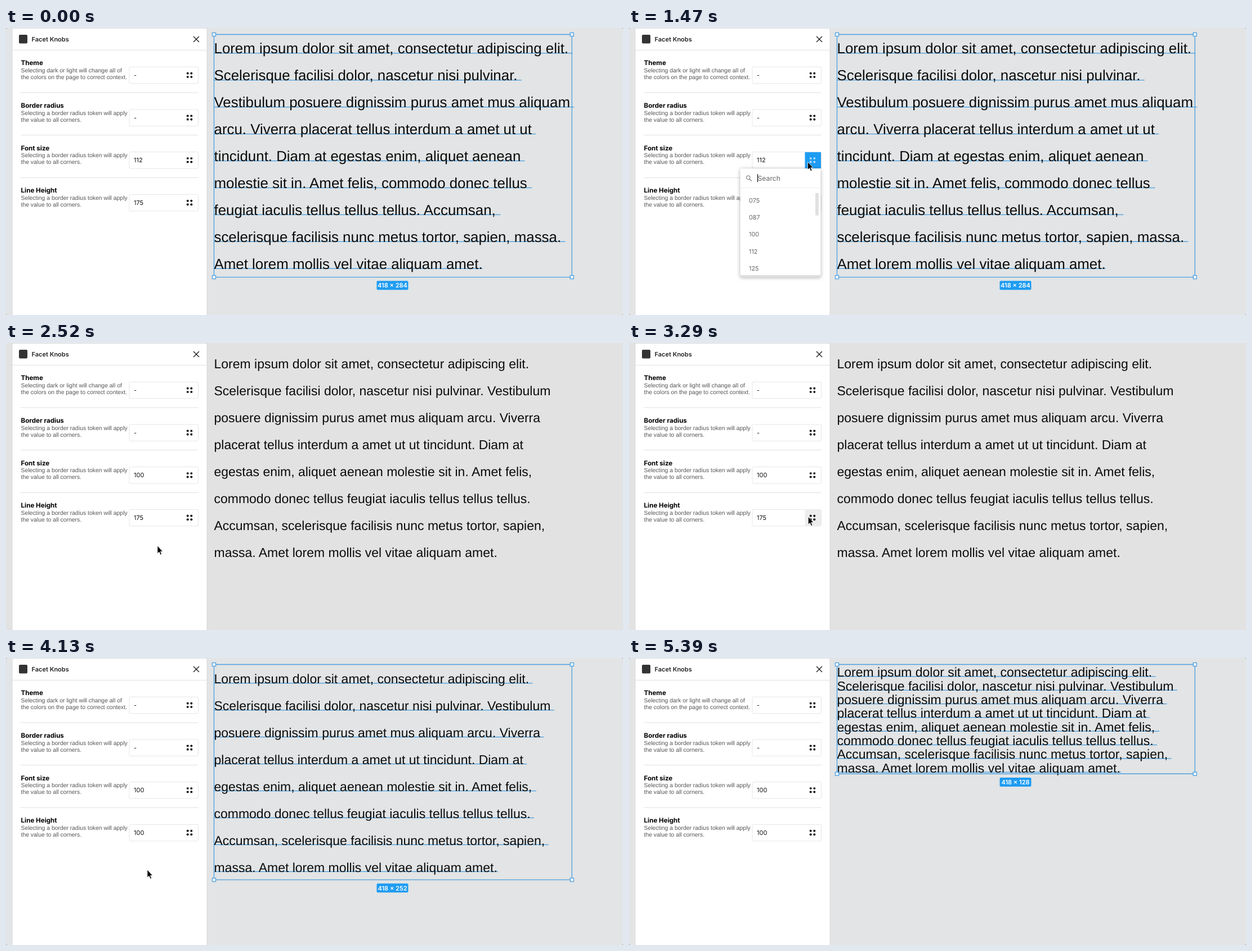
Animation, 1096 px wide and 511 px high, one loop 5530 ms. Source, as an HTML page:

```html
<!DOCTYPE html>
<html lang="en">
<head>
<meta charset="utf-8">
<title>Text settings panel</title>
<style>
  html, body { margin: 0; width: 100%; height: 100%; overflow: hidden; }
  svg { display: block; width: 1096px; height: 511px; text-rendering: geometricPrecision; }
  .ui { font-family: Inter, sans-serif; }
  .copy { font-family: "Liberation Sans", Arial, sans-serif; }
  .menu { filter: drop-shadow(0 1px 3px #0005); }
</style>
</head>
<body>
<svg id="stage" viewBox="0 0 1096 511"></svg>
<script>
const LOOP = 5530, STEP = 70, ROW = 75.7, SCALE = 1.5215;
const BLUE = '#1e9cf2', LINE = '#4a9fe0', RULE = '#e0e0e0';
const stage = document.getElementById('stage');
const pen = document.createElement('canvas').getContext('2d');

const large = `Lorem ipsum dolor sit amet, consectetur adipiscing elit.
Scelerisque facilisi dolor, nascetur nisi pulvinar.
Vestibulum posuere dignissim purus amet mus aliquam
arcu. Viverra placerat tellus interdum a amet ut ut
tincidunt. Diam at egestas enim, aliquet aenean
molestie sit in. Amet felis, commodo donec tellus
feugiat iaculis tellus tellus tellus. Accumsan,
scelerisque facilisis nunc metus tortor, sapien, massa.
Amet lorem mollis vel vitae aliquam amet.`.split('\n');

const small = `Lorem ipsum dolor sit amet, consectetur adipiscing elit.
Scelerisque facilisi dolor, nascetur nisi pulvinar. Vestibulum
posuere dignissim purus amet mus aliquam arcu. Viverra
placerat tellus interdum a amet ut ut tincidunt. Diam at
egestas enim, aliquet aenean molestie sit in. Amet felis,
commodo donec tellus feugiat iaculis tellus tellus tellus.
Accumsan, scelerisque facilisis nunc metus tortor, sapien,
massa. Amet lorem mollis vel vitae aliquam amet.`.split('\n');

// Text block layouts: font size, line height and box height in design units
const layouts = [
  { lines: large, size: 25.86, leading: 31.5, height: 284, base: 45.2 },
  { lines: small, size: 22.99, leading: 31.5, height: 252, base: 45.2 },
  { lines: small, size: 22.99, leading: 16, height: 128, base: 33.3 }
];

const radiusNote = ['Selecting a border radius token will apply', 'the value to all corners.'];
const fields = [
  ['Theme', ['Selecting dark or light will change all of', 'the colors on the page to correct context.']],
  ['Border radius', radiusNote],
  ['Font size', radiusNote],
  ['Line Height', radiusNote]
];

// Menus: field index, opening and closing time, options
const menus = [
  { field: 2, from: 1330, to: 2240, options: ['075', '087', '100', '112', '125'] },
  { field: 3, from: 3430, to: 4060, options: ['100', '125', '150', '175', '200'] }
];

// Pointer stops: time, x, y
const path = [
  [280, 480, 420], [1120, 317.5, 238.5], [1610, 317.5, 238.5], [2030, 269, 361],
  [2800, 269, 361], [3220, 318.3, 309.3], [3640, 318.3, 309.3], [3920, 251, 377],
  [4200, 251, 377], [4620, 390.3, 372], [4690, 472, 385], [4830, 472, 385],
  [5040, 572, 430], [5320, 530, 508.5]
];

const rect = (x, y, w, h, fill, more = '') =>
  `<rect x="${x}" y="${y}" width="${w}" height="${h}" fill="${fill}" ${more}/>`;
const stroke = (d, color, width = 1) =>
  `<path d="${d}" fill="none" stroke="${color}" stroke-width="${width}"/>`;
const text = (x, y, str, size, fill = '#000', weight = 400, font = 'ui') =>
  `<text class="${font}" x="${x}" y="${y}" font-size="${size}" fill="${fill}" font-weight="${weight}">${str}</text>`;

function pointerAt(t) {
  const i = path.findIndex(p => p[0] > t);
  if (i === 0 || t >= 5390) return null;
  if (i < 0) return path.at(-1).slice(1);
  const [t0, x0, y0] = path[i - 1], [t1, x1, y1] = path[i];
  const u = (t - t0) / (t1 - t0), k = u * u * (3 - 2 * u);
  return [x0 + (x1 - x0) * k, y0 + (y1 - y0) * k];
}

function drawCopy({ lines, size, leading, height, base }, selected) {
  pen.font = `${size}px "Liberation Sans", Arial, sans-serif`;
  let out = '';
  lines.forEach((line, i) => {
    const y = base + i * leading * SCALE;
    const tail = i < lines.length - 1 ? ' ' : '';
    if (selected) out += rect(369.5, y - 1, pen.measureText(line + tail).width, 1.3, LINE);
    out += text(369.5, y, line, size, '#0b0b0b', 400, 'copy');
  });
  if (!selected) return out;

  const left = 369.5, right = 1005.3, top = 11.5, bottom = top + height * SCALE;
  out += stroke(`M${left} ${top}H${right}V${bottom}H${left}Z`, LINE, 1.3);
  for (const x of [left, right])
    for (const y of [top, bottom])
      out += rect(x - 3, y - 3, 6, 6, '#fff', `stroke="${LINE}" stroke-width="1.3"`);
  return out + rect(658.5, bottom + 6.7, 56, 16, BLUE, 'rx="2"') +
    `<g text-anchor="middle">${text(686.5, bottom + 18.7, `418 × ${height}`, 11, '#fff', 600)}</g>`;
}

function drawField([title, note], i, value, pointer, open) {
  const y = i * ROW;
  const hover = pointer && pointer[0] > 312 && pointer[0] < 341 && Math.abs(pointer[1] - y - 84) < 15;
  let out = text(26.5, 66.3 + y, title, 11.6, '#000', 700);
  note.forEach((s, n) => out += text(26.5, 78.8 + y + n * 12.2, s, 10.42, '#555', 400, 'copy'));
  out += rect(219, 69.3 + y, 122.5, 29.5, '#fff', 'rx="2" stroke="#e6e6e6"');
  out += text(227, 88 + y, value, 11, '#111');
  if (open || hover) out += rect(312.5, 69.7 + y, 28.5, 28.8, open ? BLUE : '#ededed');
  for (const dx of [322.7, 329.3])
    for (const dy of [80.7, 87.1])
      out += `<circle cx="${dx}" cy="${dy + y}" r="1.95" fill="${open ? '#b5e0ff' : '#000'}"/>`;
  if (i < 3) out += stroke(`M26 ${115 + y}H341.5`, RULE);
  return out;
}

function drawMenu({ field, options }) {
  let out = `<g transform="translate(0 ${(field - 2) * ROW})">` +
    rect(197.5, 250.3, 143, 193, '#fff', 'rx="2" class="menu"') +
    rect(197.5, 440, 143, 3.5, '#dedede') +
    '<circle cx="211.8" cy="266.3" r="3.4" fill="none" stroke="#666"/>' +
    stroke('M214.3 268.8L218 272.6', '#666', 1.1) +
    text(228.5, 271.5, 'Search', 12.2, '#666') +
    stroke('M228.5 260V274.5', '#000', 1.1) +
    stroke('M198 284.5H340', '#eee') +
    rect(331, 293.5, 6, 40.5, '#e1e1e1', 'rx="2"');
  options.forEach((s, i) => out += text(213, 310.6 + i * 30.3, s, 10.9, '#666'));
  return out + '</g>';
}

function draw(t) {
  const selected = t < 2380 || (t >= 3640 && t < 4270) || t >= 4690;
  const layout = layouts[t < 2380 ? 0 : t < 4270 ? 1 : 2];
  const values = ['-', '-', t < menus[0].to ? '112' : '100', t < menus[1].to ? '175' : '100'];
  const menu = menus.find(m => t >= m.from && t < m.to);
  const pointer = pointerAt(t);

  let out = rect(0, 0, 1096, 511, selected ? '#555' : '#e2e2e2') +
    rect(0, 0, 1096, 511, selected ? '#e2e4e5' : '#e2e2e2', 'rx="2"') +
    drawCopy(layout, selected) +
    rect(11, 0.5, 346, 520, '#fff', 'stroke="#d2d3d4" stroke-width=".8"') +
    rect(23, 12, 15, 15.5, '#333', 'rx="2"') +
    text(45.5, 24, 'Facet Knobs', 11, '#222', 600) +
    stroke('M333 15L343 25M343 15L333 25', '#111', 1.2) +
    stroke('M11.5 39.5H356.5', RULE);
  fields.forEach((f, i) => out += drawField(f, i, values[i], pointer, menu?.field === i));
  if (menu) out += drawMenu(menu);
  if (pointer) out += `<path transform="translate(${pointer})" fill="#000" stroke="#fff" stroke-width=".7"
    d="M0 0V13.8L3.1 11L5.4 16.2L7.5 15.3L5.3 10.2H9.4Z"/>`;
  stage.innerHTML = out;
}

let last = -1;
function tick() {
  const t = Math.floor(performance.now() % LOOP / STEP) * STEP;
  if (t !== last) draw(last = t);
  requestAnimationFrame(tick);
}
tick();
</script>
</body>
</html>
```
